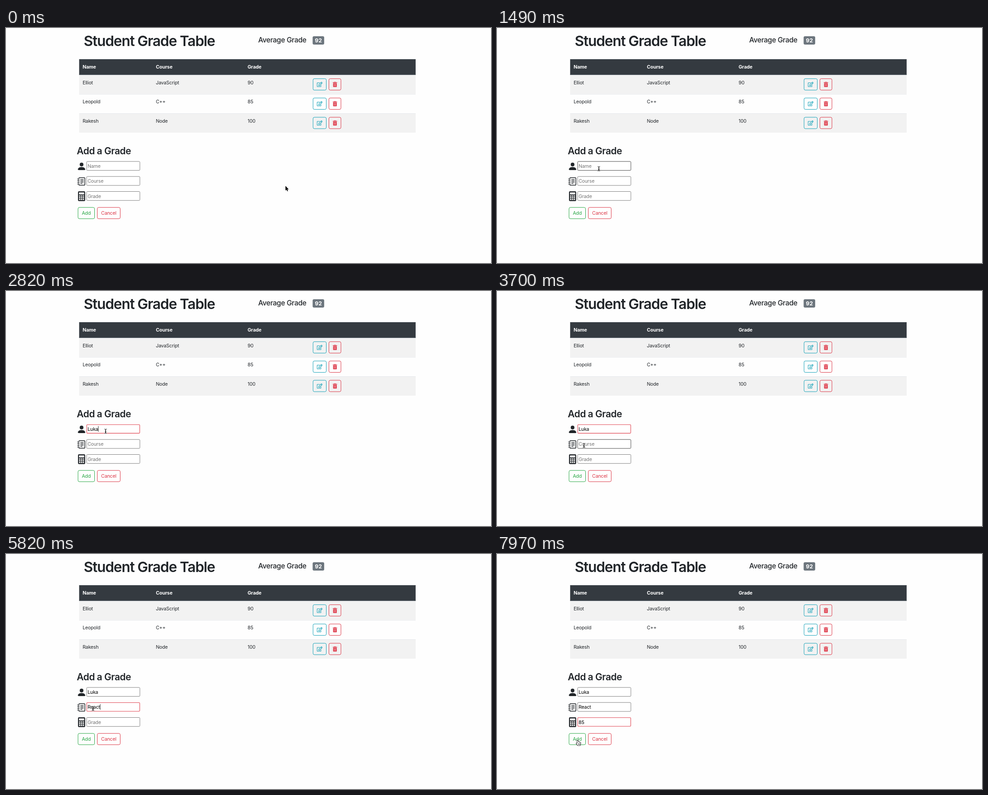
An HTML page with a canvas for the animation above (8000 ms loop, 1076 by 521 pixels).

```html
<!DOCTYPE html>
<html lang="en">
<head>
<meta charset="utf-8">
<title>Student Grade Table</title>
<style>
html, body { margin: 0; width: 100%; height: 100%; overflow: hidden; background: #fefefe; }
canvas { display: block; width: 1076px; height: 521px; }
</style>
</head>
<body>
<canvas id="stage"></canvas>
<script>
const W = 1076, H = 521, LOOP = 8000, BLINK = 480;
const INK = '#212529', TEAL = '#17a2b8', RED = '#dc3545', GREEN = '#28a745';
const canvas = document.getElementById('stage');
const ctx = canvas.getContext('2d');
const ratio = window.devicePixelRatio || 1;
canvas.width = W * ratio;
canvas.height = H * ratio;

// style: weight, size, letter spacing
const FONT = {
  title: [560, 31.6, -1.1],
  average: [500, 15.7, -0.36],
  section: [560, 21, -0.46],
  head: [700, 10.6, -0.1],
  body: [400, 10.6, -0.16],
  badge: [700, 12.2, 0],
  menu: [600, 9, -0.02]
};

const ROWS = [
  ['Elliot', 'JavaScript', '90'],
  ['Leopold', 'C++', '85'],
  ['Rakesh', 'Node', '100']
];
const COLS = [170, 332.5, 536];
const FIELDS = ['Name', 'Course', 'Grade'];
const fieldTop = i => 295.5 + i * 33.3;

const NAMES = ['ddd', 'ss', 'k318_mVale', 'dd', 'Preston', '5550142863'];
const COURSES = ['math', 'react', 'dd', 'node', 'ss', 'ddd'];

// time, focused field, values, suggestions
const STEPS = [
  [0, -1, ['', '', ''], []],
  [1560, 0, ['', '', ''], []],
  [1600, 0, ['', '', ''], NAMES],
  [2370, 0, ['L', '', ''], []],
  [2490, 0, ['Lu', '', ''], []],
  [2670, 0, ['Luk', '', ''], []],
  [2820, 0, ['Luka', '', ''], []],
  [3790, 1, ['Luka', '', ''], COURSES],
  [4390, 1, ['Luka', 'R', ''], ['react']],
  [4600, 1, ['Luka', 'Re', ''], ['react']],
  [4660, 1, ['Luka', 'Rea', ''], ['react']],
  [4870, 1, ['Luka', 'Reac', ''], ['react']],
  [4990, 1, ['Luka', 'React', ''], ['react']],
  [5820, 1, ['Luka', 'React', ''], []],
  [5850, 2, ['Luka', 'React', ''], []],
  [6780, 2, ['Luka', 'React', '8'], ['85']],
  [7230, 2, ['Luka', 'React', '85'], ['85']],
  [7260, 2, ['Luka', 'React', '85'], []]
];

// start, end, from, bend, to
const MOVES = [
  [0, 490, [620, 350], [614, 350], [608, 351]],
  [970, 1530, [598, 353], [400, 348], [221, 311]],
  [3070, 3690, [221, 311], [212, 332], [193, 342.5]],
  [7630, 7965, [193, 342.5], [424, 525], [179, 413]]
];

const PENCIL = 'M402 345l32-32c5-5 14-1 14 6V464c0 26-22 48-48 48H48c-26 0-48-22-48-48V112' +
  'c0-26 22-48 48-48h273c8 0 11 9 6 14l-32 32-6 2H48v352h352V350zM559 143L296 406l-90 10' +
  'c-26 3-49-19-46-46l10-90L433 17c23-23 60-23 83 0l43 43c23 23 23 60 0 83z' +
  'M460 174L402 116 216 302l-7 65 65-7zM525 94l-43-43c-4-4-11-4-15 0L436 82l58 58 31-31c4-4 4-11 0-15z';

function useFont(name) {
  const [weight, size, spacing] = FONT[name];
  ctx.font = `${weight} ${size}px Inter, "Liberation Sans", sans-serif`;
  ctx.letterSpacing = spacing + 'px';
}

function text(str, x, y, font, color, align = 'left') {
  useFont(font);
  ctx.fillStyle = color;
  ctx.textAlign = align;
  ctx.fillText(str, x, y);
}

function rect(x, y, w, h, color) {
  ctx.fillStyle = color;
  ctx.fillRect(x, y, w, h);
}

function round(x, y, w, h, r, fill, stroke, line = 1) {
  ctx.beginPath();
  ctx.roundRect(x, y, w, h, r);
  if (fill) { ctx.fillStyle = fill; ctx.fill(); }
  if (stroke) { ctx.strokeStyle = stroke; ctx.lineWidth = line; ctx.stroke(); }
}

function path(d, fill, stroke, line = 1) {
  const p = new Path2D(d);
  ctx.lineJoin = 'round';
  ctx.lineCap = 'round';
  if (stroke) { ctx.strokeStyle = stroke; ctx.lineWidth = line; ctx.stroke(p); }
  if (fill) { ctx.fillStyle = fill; ctx.fill(p, 'evenodd'); }
}

function at(x, y, draw, scale = 1) {
  ctx.save();
  ctx.translate(x, y);
  ctx.scale(scale, scale);
  draw();
  ctx.restore();
}

function drawActions(y) {
  round(681.2, y, 29.4, 25.3, 3, null, TEAL);
  round(716.4, y, 26.7, 25.3, 3, null, RED);
  at(689.8, y + 7.2, () => path(PENCIL, TEAL), 12.2 / 576);
  at(725, y + 7, () => {
    rect(0, 1, 9.6, 1.4, RED);
    path('M3 1V.4H6.6V1', null, RED, .8);
    round(.7, 3, 8.2, 8.4, 1, RED);
    for (const x of [2.6, 4.5, 6.4]) rect(x, 4.4, .7, 5.4, '#f8d5d8');
  });
}

function drawTable() {
  rect(162.3, 69.3, 746.5, 34.7, '#343a40');
  rect(162.3, 69.3, 746.5, .7, '#454d55');
  rect(162.3, 102.7, 746.5, 1.3, '#454d55');
  FIELDS.forEach((s, i) => text(s, COLS[i], 90.3, 'head', '#fff'));
  ROWS.forEach((row, i) => {
    const y = 104 + i * 42.75;
    if (i % 2 === 0) rect(162.3, y, 746.5, 42.5, '#f2f2f2');
    rect(162.3, y, 746.5, .7, '#dee2e6');
    row.forEach((s, k) => text(s, COLS[k], y + 20.6, 'body', INK));
    drawActions(y + 8.4);
  });
}

function drawIcons() {
  at(156.7, 295.8, () => {
    path('M3 14s-1 0-1-1 1-4 6-4 6 3 6 4-1 1-1 1zM11 5a3 3 0 1 1-6 0 3 3 0 0 1 6 0z', INK);
  }, 1.37);

  round(161.4, 331.8, 13.6, 16.8, 1.8, null, INK, 1.5);
  for (let i = 0; i < 4; i++) {
    const y = 334 + i * 3.7;
    rect(160, y - .7, 3, 2.7, '#fefefe');
    rect(158.2, y, 4.8, 1.4, INK);
    rect(165, 335.2 + i * 2.9, i === 3 ? 4.5 : 7.2, 1.3, INK);
  }

  round(159.8, 362, 15.8, 21.8, 2, INK);
  rect(162, 364.5, 11.4, 4.6, '#fefefe');
  for (let r = 0; r < 3; r++)
    for (let c = 0; c < 3; c++)
      rect(162 + c * 4.1, 371.2 + r * 3.8, 3, 2.5, '#fefefe');
}

function drawField(i, value, focused, hover, caret) {
  const y = fieldTop(i);
  if (focused) round(179.1, y + .7, 117.6, 19.2, 1.6, '#fff', '#e04350', 1.1);
  else round(178.9, y + .4, 118.1, 19.8, 1.8, '#fff', hover ? '#484848' : '#808080');
  text(value || FIELDS[i], 181, y + 14.4, 'body', value ? '#000' : '#757575');
  if (caret) rect(181 + (value ? ctx.measureText(value).width : 0), y + 4, .9, 12.5, '#111');
}

function drawMenu(i, items) {
  const y = fieldTop(i) + 21.5;
  const h = items.length * 24.4 + 10.6;
  ctx.save();
  ctx.shadowColor = 'rgba(0,0,0,.35)';
  ctx.shadowBlur = 3 * ratio;
  ctx.shadowOffsetY = ratio;
  round(178.7, y, 130.1, h, 3, '#28272b');
  ctx.restore();
  items.forEach((s, k) => text(s, 187, y + 21 + k * 24.4, 'menu', '#f4f4f4'));
}

function pointerAt(t) {
  let [x, y] = MOVES[0][2];
  for (const [start, end, a, b, c] of MOVES) {
    if (t < start) break;
    const p = Math.min(1, (t - start) / (end - start));
    const e = p * p * (3 - 2 * p), q = 1 - e;
    [x, y] = a.map((v, k) => q * q * v + 2 * q * e * b[k] + e * e * c[k]);
  }
  return [x, y];
}

const inside = (x, y, l, t, w, h) => x >= l && x <= l + w && y >= t && y <= t + h;

function drawPointer(x, y, shape) {
  at(x, y, () => {
    if (shape === 'beam') {
      const d = 'M-2.2 -5Q0 -5 0 -3.4V3.4Q0 5 -2.2 5M2.2 -5Q0 -5 0 -3.4V3.4Q0 5 2.2 5M-1.2 1.6H1.2';
      path(d, null, 'rgba(255,255,255,.8)', 2.2);
      path(d, null, '#111', 1);
    } else if (shape === 'hand') {
      path('M-1.1 .6Q0 -.6 1 .6L1.4 4Q2.6 3.3 3.2 4.4Q4.4 3.8 5 4.9Q6.3 4.6 6.4 6L6.1 8.4L5.2 11.4H.2L-2.8 7.6Q-3.2 6.2 -1.8 6.1L-.5 7.2Z', '#fff', '#111', 1.9);
      path('M1.5 7.2V9.6M3 7.2V9.6M4.5 7.2V9.6', null, '#111', .7);
    } else {
      path('M0 0V10.4L2.3 8.3L4 12L5.7 11.2L4.1 7.7H7.2Z', '#000', '#fff', 1.4);
    }
  });
}

function draw(t) {
  ctx.setTransform(ratio, 0, 0, ratio, 0, 0);
  rect(0, 0, W, H, '#fefefe');

  text('Student Grade Table', 172.5, 40.2, 'title', INK);
  text('Average Grade', 559.5, 31.5, 'average', INK);
  round(680.3, 18.2, 25.6, 18.6, 3, '#6c757d');
  text('92', 693.1, 31.6, 'badge', '#fff', 'center');
  drawTable();
  text('Add a Grade', 157, 279.8, 'section', INK);
  drawIcons();

  round(159.8, 397.8, 36.7, 25, 3, null, GREEN);
  text('Add', 178.1, 414.3, 'body', GREEN, 'center');
  round(202.5, 397.8, 50.9, 25, 3, null, RED);
  text('Cancel', 228, 414.3, 'body', RED, 'center');

  const [since, focus, values, items] = STEPS.findLast(s => t >= s[0]);
  const caretOn = Math.floor((t - since) / BLINK) % 2 === 0;
  const [x, y] = pointerAt(t);
  let shape = 'arrow';
  values.forEach((value, i) => {
    const hover = inside(x, y, 178.5, fieldTop(i), 119, 20.6);
    if (hover) shape = 'beam';
    drawField(i, value, focus === i, hover, focus === i && caretOn);
  });
  if (inside(x, y, 159, 397, 38, 26) || inside(x, y, 202, 397, 52, 26)) shape = 'hand';
  if (items.length) drawMenu(focus, items);
  drawPointer(x, y, shape);
}

const begin = performance.now();
function frame() {
  draw((performance.now() - begin) % LOOP);
  requestAnimationFrame(frame);
}
frame();
</script>
</body>
</html>
```
